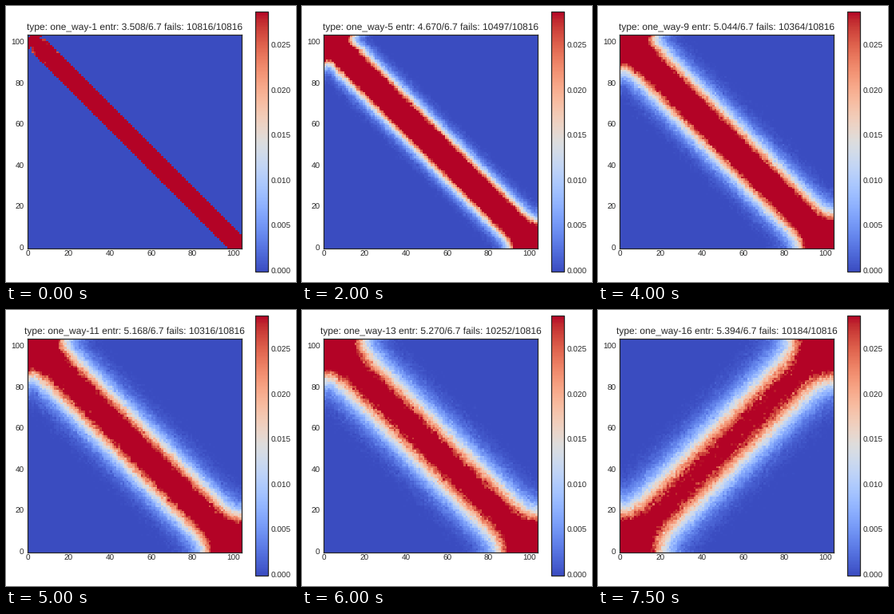
Animation, 363 px wide and 346 px high, one loop 8 s. Source, as a matplotlib script:

```python
import numpy as np
import matplotlib.pyplot as plt
from matplotlib.animation import FuncAnimation

W, H, DPI = 363, 346, 72
CARDS, PASSES, TRIALS = 104, 16, 10000
SMALLEST, BIGGEST = 2, 7  # packet sizes
VMAX = 3 / CARDS
INK = "0.15"

plt.rcParams.update({
    "font.family": "Liberation Sans",
    "font.size": 10,
    "text.color": INK,
    "text.hinting": "none",
    "axes.edgecolor": INK,
    "axes.linewidth": 1.25,
    "xtick.color": INK,
    "ytick.color": INK,
    "ytick.alignment": "center",
})


def shuffle_matrix():
    """Chance that a card moves from row to column in one overhand pass."""
    move = np.zeros((CARDS, CARDS))
    cut = np.zeros(CARDS + 1)  # chance that a packet starts here
    cut[0] = 1
    sizes = range(SMALLEST, BIGGEST + 1)
    for start in range(CARDS):
        chance = cut[start] / len(sizes)
        for size in sizes:
            size = min(size, CARDS - start)
            t = np.arange(size)
            move[CARDS - 1 - start - t, start + size - 1 - t] += chance
            cut[start + size] += chance
    return move


def sampled(chances, seed):
    rng = np.random.default_rng(seed)
    rows = chances / chances.sum(axis=1, keepdims=True)
    return np.array([rng.multinomial(TRIALS, row) for row in rows]) / TRIALS


def entropy(grid):
    """Mean entropy of the rows in bits."""
    p = grid[grid > 0]
    return -(p * np.log2(p)).sum() / CARDS


def fails(grid):
    """Cells more than a quarter away from a uniform spread."""
    return np.sum(np.abs(grid * CARDS - 1) > 0.25)


def box(x0, y0, x1, y1):
    return [x0 / W, 1 - y1 / H, (x1 - x0) / W, (y1 - y0) / H]


step = shuffle_matrix()
grids = [sampled(np.linalg.matrix_power(step, k), k)
         for k in range(1, PASSES + 1)]

fig = plt.figure(figsize=(W / DPI, H / DPI), dpi=DPI, facecolor="white")
ax = fig.add_axes(box(27, 36, 295, 304))
image = ax.imshow(grids[0], cmap="coolwarm", vmin=0, vmax=VMAX,
                  origin="lower", extent=(0, CARDS, 0, CARDS),
                  interpolation="nearest", aspect="auto")
ax.set_xticks(range(0, 101, 20))
ax.set_yticks(range(0, 101, 20))
ax.tick_params(axis="x", length=0, pad=3)
ax.tick_params(axis="y", length=0, pad=4.5)
title = ax.set_title("", fontsize=12, pad=5)

bar = fig.colorbar(image, cax=fig.add_axes(box(312, 7, 328, 333)))
bar.set_ticks(np.arange(6) * 0.005)
bar.ax.tick_params(length=0, pad=4)


def update(i):
    grid = grids[i]
    image.set_data(grid)
    title.set_text(f"type: one_way-{i + 1} entr: {entropy(grid):.3f}/"
                   f"{np.log2(CARDS):.1f} fails: {fails(grid)}/{CARDS ** 2}")
    return image, title


anim = FuncAnimation(fig, update, frames=PASSES, interval=500,
                     repeat=True, repeat_delay=0, blit=False)
plt.show()
```
